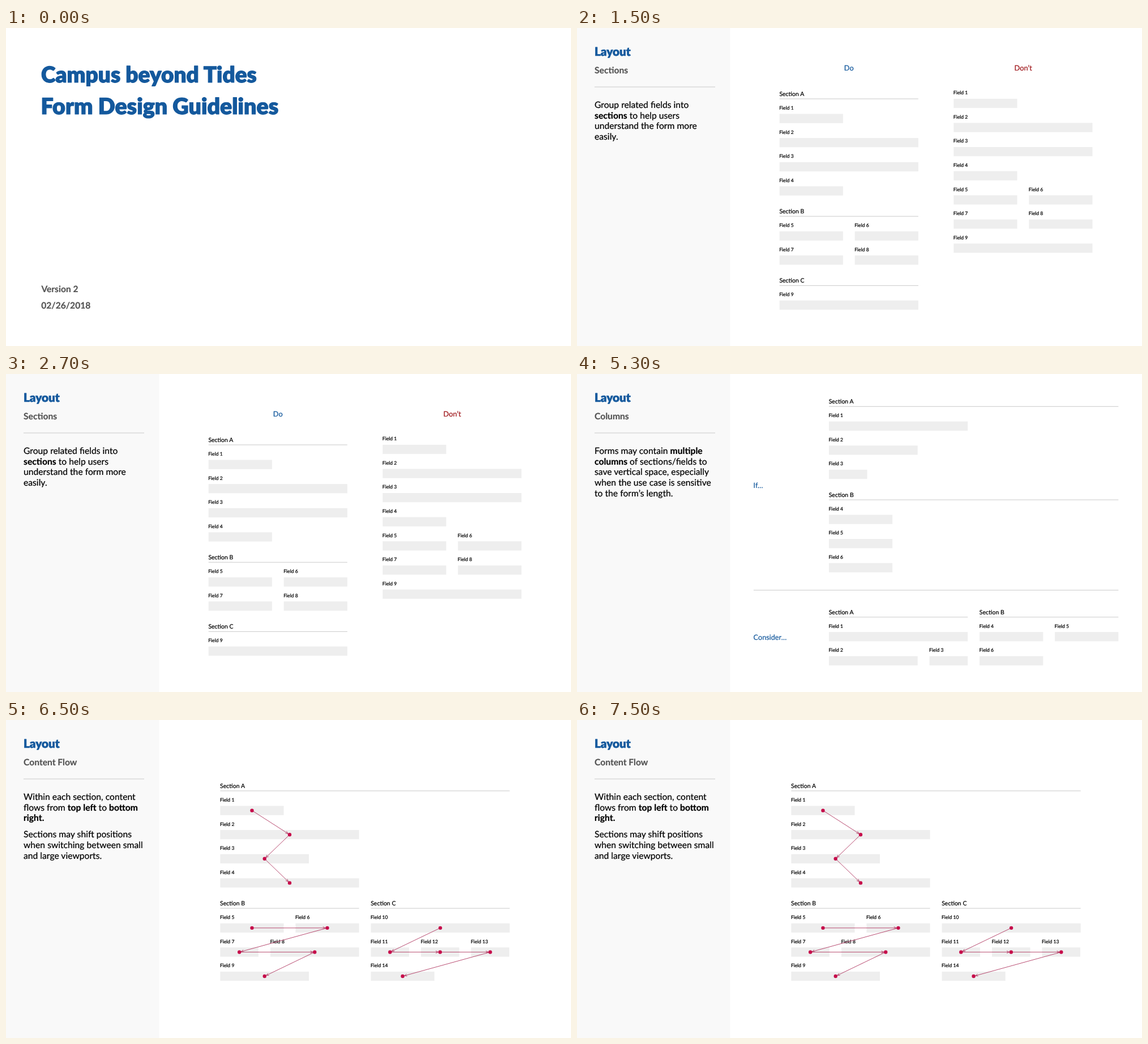
Write an HTML page with a canvas that moves like this. It is 998 by 561 pixels and loops after 8 s.

```html
<!DOCTYPE html>
<html lang="en">
<head>
<meta charset="utf-8">
<title>Form Design Guidelines</title>
<style>
  html, body { margin: 0; width: 100%; height: 100%; overflow: hidden; background: #fff; }
  canvas { display: block; width: 998px; height: 561px; }
</style>
</head>
<body>
<canvas id="stage"></canvas>
<script>
const W = 998, H = 561, LOOP = 8000;
const BLUE = '#14599d', GRAY = '#555555', RULE = '#cacaca', RED = '#9e1318';
const DOT = '#c60d4b', ARROW = '#b23a64';

// Field widths on the form grid
const GAP = 20.9, FULL = 245.2, HALF = 112.2, WIDE = 156.7, SMALL = 67.6;
const SPAN = FULL * 2 + GAP, STEP = FULL - HALF, ROW = 42.58, BAR = 16.3;

const canvas = document.getElementById('stage');
const ctx = canvas.getContext('2d');
const dpr = window.devicePixelRatio || 1;
canvas.width = Math.round(W * dpr);
canvas.height = Math.round(H * dpr);
ctx.scale(dpr, dpr);
ctx.textRendering = 'geometricPrecision';
ctx.lineJoin = 'round';

// A hairline outline gives the type a slightly heavier cut
function text(str, x, y, size, color = '#000', weight = 400, align = 'left') {
  ctx.font = `${weight} ${size}px Lato, Carlito, sans-serif`;
  ctx.fillStyle = ctx.strokeStyle = color;
  ctx.textAlign = align;
  ctx.lineWidth = weight === 900 ? size * 0.03 : 0.22;
  ctx.fillText(str, x, y);
  ctx.strokeText(str, x, y);
}

// Text with *bold* runs
function rich(str, x, y, size) {
  str.split('*').forEach((run, i) => {
    text(run, x, y, size, '#000', i % 2 ? 700 : 400);
    x += ctx.measureText(run).width;
  });
}

function rule(x, y, w) {
  ctx.fillStyle = RULE;
  ctx.fillRect(x, y - 0.5, w, 1);
}

function section(name, x, y, w) {
  text('Section ' + name, x - 0.3, y - 5.4, 10.5);
  rule(x, y, w);
}

// Draws a labelled field and returns its centre
function field(n, x, y, w) {
  text('Field ' + n, x - 0.5, y - 7.5, 8.6);
  ctx.fillStyle = '#eeeeee';
  ctx.fillRect(x, y, w, BAR);
  return [x + w / 2, y + BAR / 2];
}

// Rows of fields; each row lists [offset, width] pairs
function form(first, x, y, rows) {
  const points = [];
  rows.forEach((row, r) => {
    for (const [dx, w] of row) {
      points.push(field(first + points.length, x + dx, y + r * ROW, w));
    }
  });
  return points;
}

function arrow([x1, y1], [x2, y2]) {
  const a = Math.atan2(y2 - y1, x2 - x1);
  const tx = x2 - Math.cos(a) * 3.2, ty = y2 - Math.sin(a) * 3.2;
  ctx.beginPath();
  ctx.moveTo(x1, y1);
  ctx.lineTo(tx, ty);
  for (const turn of [-0.42, 0.42]) {
    ctx.moveTo(tx, ty);
    ctx.lineTo(tx - Math.cos(a + turn) * 5, ty - Math.sin(a + turn) * 5);
  }
  ctx.strokeStyle = ARROW;
  ctx.lineWidth = 0.9;
  ctx.stroke();
}

function flow(points) {
  points.slice(1).forEach((p, i) => arrow(points[i], p));
  ctx.fillStyle = DOT;
  for (const [x, y] of points) {
    ctx.beginPath();
    ctx.arc(x, y, 3.2, 0, Math.PI * 2);
    ctx.fill();
  }
}

function sidebar(topic, ...paragraphs) {
  ctx.fillStyle = '#f9f9f9';
  ctx.fillRect(0, 0, 270.3, H);
  text('Layout', 31, 48.6, 20.7, BLUE, 900);
  text(topic, 31, 80, 15.65, GRAY, 700);
  rule(31, 104, 213);
  let y = 140.8;
  for (const lines of paragraphs) {
    for (const line of lines) {
      rich(line, 31, y, 15.7);
      y += 18.75;
    }
    y += 10.2;
  }
}

function cover() {
  text('Campus beyond Tides', 62, 96.3, 38.8, BLUE, 900);
  text('Form Design Guidelines', 61.6, 151.9, 39.4, BLUE, 900);
  text('Version 2', 62.4, 466.4, 15.6, GRAY, 700);
  text('02/26/2018', 62.2, 495.4, 15.65, GRAY, 700);
}

const one = w => [[0, w]];
const pair = [[0, HALF], [STEP, HALF]];

function sections() {
  sidebar('Sections', [
    'Group related fields into',
    '*sections* to help users',
    'understand the form more',
    'easily.'
  ]);
  text('Do', 480.3, 75, 12.8, BLUE, 400, 'center');
  text('Don’t', 788.2, 75, 12.8, RED, 400, 'center');

  const x = 357.7;
  section('A', x, 125, FULL);
  form(1, x, 151.5, [one(HALF), one(FULL), one(FULL), one(HALF)]);
  section('B', x, 332.2, FULL);
  form(5, x, 358.7, [pair, pair]);
  section('C', x, 454.4, FULL);
  form(9, x, 480.7, [one(FULL)]);

  form(1, 665.3, 124.8,
    [one(HALF), one(FULL), one(FULL), one(HALF), pair, pair, one(FULL)]);
}

function columns() {
  sidebar('Columns', [
    'Forms may contain *multiple*',
    '*columns* of sections/fields to',
    'save vertical space, especially',
    'when the use case is sensitive',
    'to the form’s length.'
  ]);
  const x = 445, x2 = x + FULL + GAP;
  text('If…', 311.6, 200.8, 12.7, BLUE);
  section('A', x, 57.3, SPAN);
  form(1, x, 83.7, [one(FULL), one(WIDE), one(SMALL)]);
  section('B', x, 222, SPAN);
  form(4, x, 248.4, [one(HALF), one(HALF), one(HALF)]);

  rule(312, 381.3, 644.4);

  text('Consider…', 311.6, 468.8, 12.7, BLUE);
  section('A', x, 428.9, FULL);
  form(1, x, 455.2, [one(FULL), [[0, WIDE], [FULL - SMALL, SMALL]]]);
  section('B', x2, 428.9, FULL);
  form(4, x2, 455.2, [pair, one(HALF)]);
}

function contentFlow() {
  sidebar('Content Flow', [
    'Within each section, content',
    'flows from *top left* to *bottom*',
    '*right.*'
  ], [
    'Sections may shift positions',
    'when switching between small',
    'and large viewports.'
  ]);
  const x = 378.4, x2 = x + FULL + GAP, third = SMALL + GAP;
  section('A', x, 125, SPAN);
  section('B', x, 332.2, FULL);
  section('C', x2, 332.2, FULL);
  [
    form(1, x, 151.5, [one(HALF), one(FULL), one(WIDE), one(FULL)]),
    form(5, x, 358.7, [pair, [[0, SMALL], [third, WIDE]], one(WIDE)]),
    form(10, x2, 358.7,
      [one(FULL), [[0, SMALL], [third, SMALL], [2 * third, SMALL]], one(HALF)])
  ].forEach(flow);
}

const slides = [[500, cover], [3500, sections], [6500, columns], [LOOP, contentFlow]];
let shown = null, start = null;

function tick(now) {
  if (start === null) start = now;
  const t = Math.max(0, now - start) % LOOP;
  const slide = slides.find(([end]) => t < end)[1];
  if (slide !== shown) {
    shown = slide;
    ctx.fillStyle = '#fff';
    ctx.fillRect(0, 0, W, H);
    slide();
  }
  requestAnimationFrame(tick);
}
tick(performance.now());
</script>
</body>
</html>
```
